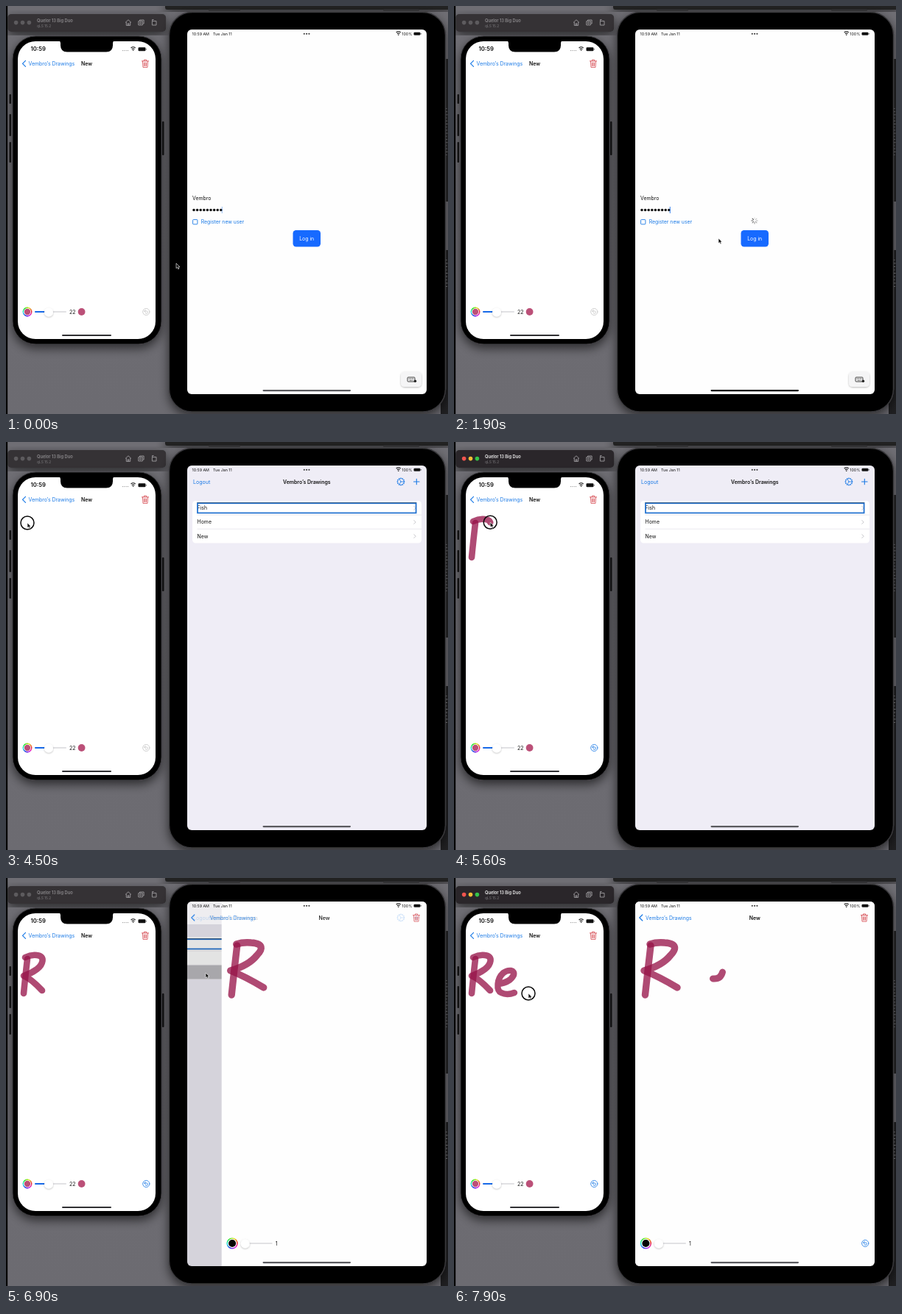
Write an HTML page that moves like this. It is 600x555 px and loops after 8000 ms.

```html
<!DOCTYPE html>
<html lang="en">
<head>
<meta charset="utf-8">
<title>Shared drawing</title>
<style>
  html, body { margin: 0; width: 100%; height: 100%; overflow: hidden; background: #000; }
  svg { display: block; width: 100vw; height: 100vh; }
  text { font: 6.9px Inter, "Liberation Sans", sans-serif; fill: #111; white-space: pre; }
  .bold { font-weight: 600; }
  .blue { fill: #1b7ae6; }
  .line { fill: none; stroke: #1b7ae6; stroke-linecap: round; stroke-linejoin: round; }
  .ink { fill: none; stroke: #961248; stroke-opacity: .76; stroke-linecap: round; stroke-linejoin: round; }
</style>
</head>
<body>
<svg id="stage" viewBox="0 0 600 555" preserveAspectRatio="none"></svg>
<script>
const LOOP = 8000, STEP = 100, SCREEN_W = 325;
const stage = document.getElementById('stage');

// Shape helpers
const rect = (x, y, w, h, r, fill, more = '') =>
  `<rect x="${x}" y="${y}" width="${w}" height="${h}" rx="${r}" fill="${fill}" ${more}/>`;
const dot = (x, y, r, fill, more = '') => `<circle cx="${x}" cy="${y}" r="${r}" fill="${fill}" ${more}/>`;
const text = (x, y, s, more = '') => `<text x="${x}" y="${y}" ${more}>${s}</text>`;
const line = (d, width = 1, more = '') => `<path class="line" d="${d}" stroke-width="${width}" ${more}/>`;
const times = (n, f) => Array.from({ length: n }, (_, i) => f(i)).join('');
const group = (id, body, more = '') => `<g id="${id}" ${more}>${body}</g>`;

const backChevron = (x, y) => line(`M${x + 4} ${y - 4}l-4 4 4 4`, 1.2);
const rowChevron = y => line(`M553.8 ${y - 2.4}l2.4 2.4-2.4 2.4`, .8, 'style="stroke:#b9b9be"');
const trash = (x, y) => line(
  `M${x - 4.6} ${y - 3.4}h9.2M${x - 1.6} ${y - 3.6}v-1.5h3.2v1.5M${x - 3.6} ${y - 3.2}l.6 8.3h6l.6-8.3` +
  `M${x} ${y - 1.3}v4.5M${x - 1.6} ${y - 1.3}l.2 4.5M${x + 1.6} ${y - 1.3}l-.2 4.5`, .8, 'style="stroke:#d5434b"');
const undo = (id, x, y) => group(id,
  `<circle class="line" cx="${x}" cy="${y}" r="4.6" stroke-width=".8"/>` +
  line(`M${x - .8} ${y - 2.6}l-1.8 1.6 1.8 1.6M${x - 2.4} ${y - 1}h3a1.6 1.6 0 0 1 0 3.2h-1.4`, .8));

function colorWell(x, y, r, fill) {
  const n = 24, point = i => {
    const a = -i * 2 * Math.PI / n;
    return `${(x + r * Math.cos(a)).toFixed(2)} ${(y + r * Math.sin(a)).toFixed(2)}`;
  };
  return dot(x, y, r, '#fff') +
    times(n, i => `<path d="M${point(i)}L${point(i + 1.1)}" stroke="hsl(${i * 360 / n},78%,50%)" stroke-width="1.4"/>`) +
    dot(x, y, r * .73, fill);
}

const slider = (x, end, knob, y, label) =>
  rect(x, y - 1, end - x, 2, 1, '#e1e1e4') + rect(x, y - 1, knob - x, 2, 1, '#1769e8') +
  dot(knob, y + .4, 6, '#fff', 'filter="url(#soft)"') + text(end + 4, y + 2.6, label);

const wifi = (x, y) => `<g fill="none" stroke="#111" stroke-width="1.1">
  <path d="M${x - 3} ${y - 1.8}q3-2.6 6 0M${x - 1.8} ${y}q1.8-1.5 3.6 0"/></g>` + dot(x, y + 1.5, .8, '#111');
const battery = (x, y, w, h) =>
  rect(x, y, w, h, 1.3, '#111') + rect(x + w + .5, y + h / 2 - .8, .8, 1.6, .3, '#555');

const ink = (id, d, width) => `<path id="${id}" class="ink" d="${d}" stroke-width="${width}" pathLength="1"/>`;

// Static backdrop and window chrome
const backdrop = `
  <defs>
    <filter id="soft" x="-50%" y="-50%" width="200%" height="200%">
      <feDropShadow dx="0" dy=".9" stdDeviation="1.3" flood-opacity=".28"/></filter>
    <filter id="shade" x="-20%" y="-20%" width="140%" height="140%">
      <feDropShadow dx="0" dy="5" stdDeviation="7" flood-opacity=".6"/></filter>
    <linearGradient id="wall" x2="0" y2="1">
      <stop stop-color="#6f6e74"/><stop offset="1" stop-color="#6c6b71"/></linearGradient>
    <clipPath id="padClip"><rect x="246" y="32" width="325" height="496" rx="6"/></clipPath>
  </defs>
  ${rect(0, 0, 600, 555, 0, 'url(#wall)')}
  ${rect(0, 0, 2.2, 555, 0, '#050506')}
  ${rect(590, 72, 10, 194, 0, '#242426')}${rect(590, 332, 10, 223, 0, '#202022')}
  ${times(16, i => rect(597, 139 + i * 4.2, 1.6 + i * 7 % 3 * .5, 1, 0, '#77777a'))}
  ${times(9, i => rect(597, 345 + i * 4.5, 1.5 + i * 5 % 3 * .5, 1, 0, '#88888b'))}
  ${rect(216, -6, 390, 11, 3, '#222224', 'filter="url(#shade)"')}
  ${rect(275, 4.5, 43, 2.5, 1, '#39393b')}${rect(512, 4.5, 49, 2.5, 1, '#39393b')}`;

const phone = `
  ${rect(2.2, 11, 215, 24, 5, '#343234', 'id="bar" filter="url(#shade)"')}
  ${times(3, i => dot(13.6 + i * 8.9, 22.6, 2.8, '#5d5b5e', `id="light${i}"`))}
  ${text(42, 22.3, 'Quelor 13 Big Duo', 'id="device" class="bold" style="font-size:5.7px"')}
  ${text(42, 28.6, 'qLS 15.2', 'style="font-size:4.8px;fill:#7b797c"')}
  <g fill="none" stroke="#a09ea1" stroke-width=".9">
    <path d="M162 22.5l4-3.7 4 3.7M163.3 22v4.4h5.4V22M165.3 26.4v-2.6h1.5v2.6"/>
    <path d="M181.5 20v-1h5.6v5h-1M179.8 20.6h5.5v5.3h-5.5z"/><circle cx="182.5" cy="23.2" r="1.1"/>
    <path d="M198.4 20.5h5.6v5.5h-5.6zM198.6 20.5v-2h2"/>
  </g>
  ${[[120, 13], [147, 30], [185, 28]].map(([y, h]) => rect(4.5, y, 2.5, h, 1, '#171718')).join('')}
  ${rect(212, 157, 2.5, 46, 1, '#171718')}
  ${rect(9, 41, 202, 419, 31, '#000', 'filter="url(#shade)" stroke="#3a393c" stroke-width="1"')}
  ${rect(16, 48, 187, 405, 24, '#fff')}
  <path d="M72 47.5q2 .5 2 3v3q0 9 9 9h53q9 0 9-9v-3q0-2.500 2-3z" fill="#000"/>
  ${text(33.5, 61.4, '10:59', 'class="bold" style="font-size:7.7px"')}
  ${times(4, i => dot(158.6 + i * 2.3, 60.6, .6, '#888'))}
  ${wifi(172.6, 58.8)}${battery(179.5, 56.2, 10, 5)}
  ${backChevron(22.5, 78.3)}${text(30.5, 80.8, 'Vembro\u2019s Drawings', 'class="blue"')}
  ${text(102, 80.8, 'New', 'class="bold"')}${trash(189, 78.3)}
  ${ink('stem', 'M29 110Q26 136 24 157', 8.6)}
  ${ink('bowl', 'M26 108Q34 104 42 105C54 106 50 118 42 124Q34 130 24 133Q34 137 49 153', 8.6)}
  ${ink('letterE', 'M61 144Q76 142 81 132C83 125 74 124 67 129C58 137 57 153 64 156Q72 160 82 156', 8.4)}
  ${colorWell(29, 416, 5.7, '#bd4f77')}${slider(39, 82, 58, 416, '22')}${dot(102.6, 416, 4.9, '#bb5078')}
  ${undo('phoneUndo', 190.3, 416)}
  ${rect(76, 447, 67, 2, 1, '#303033')}`;

const login = `
  ${rect(246, 32, 325, 496, 0, '#fefefe')}
  ${text(253, 264, 'Vembro')}
  ${times(9, i => dot(255 + i * 4.6, 277.6, 1.75, '#111'))}
  ${rect(292.8, 273, .9, 9, 0, '#2274e8', 'id="caret"')}
  ${rect(253.6, 290.6, 6.3, 6.3, .8, 'none', 'stroke="#1b7ae6" stroke-width=".9"')}
  ${text(264.7, 296.4, 'Register new user', 'class="blue"')}
  ${group('spinner', times(8, i => `<path id="spoke${i}" d="M408 290v-2.200" stroke="#555" stroke-width="1"
    stroke-linecap="round" transform="rotate(${i * 45} 408 292)"/>`))}
  ${group('button', rect(389.5, 305, 37.5, 22.5, 4.2, '#176aff') +
    text(408.2, 318.7, 'Log in', 'text-anchor="middle" style="fill:#fff"'))}
  ${rect(536, 497.5, 28, 20.5, 5, '#f5f5f6', 'filter="url(#soft)"')}
  <g fill="none" stroke="#333" stroke-width=".9">${rect(545, 505, 10, 6, 1, 'none')}
    <path d="M546.5 507h7M547.5 509.3h5" stroke-dasharray="1 .5"/></g>${dot(555.4, 510.3, 1.8, '#222')}`;

const list = `
  ${rect(246, 32, 325, 496, 0, '#efedf6')}
  ${rect(253, 80, 311, 57.6, 4.5, '#fff')}
  <path id="picked" d="M253 118.500h311v14.600q0 4.500-4.500 4.500h-302q-4.500 0-4.500-4.500z" fill="#bdbcc0"/>
  <path d="M259.500 99.200H564M259.500 118.300H564" stroke="#dddce2" stroke-width=".6"/>
  ${['Fish', 'Home', 'New'].map((s, i) => text(259.6, 92.2 + i * 19.2, s) + rowChevron(89.8 + i * 19.2)).join('')}
  ${rect(260, 83.3, 296.600, 13.2, 0, 'none', 'stroke="#1c6ecf" stroke-width="1.700"')}
  <path d="M259.300 82.600h298" stroke="#26415f" stroke-width=".7"/>
  ${rect(246, 32, 325, 496, 0, '#000', 'id="dim"')}`;

const canvas = `
  ${rect(246, 32, 325, 496, 0, '#fefefe')}
  ${ink('padStem', 'M267 92Q263 126 259.500 159', 9.4)}
  ${ink('padBowl', 'M266 90Q275 87 286 88C303 89 302 97 294 105Q283 119 258 126Q278 134 303 149', 9.4)}
  ${ink('padE', 'M351.500 137Q362 138 364.500 128', 9)}
  ${colorWell(260.4, 497, 6.9, '#050505')}${slider(278, 315, 278, 497, '1')}
  ${undo('padUndo', 558.2, 497)}`;

const gear = `<circle class="line" cx="536" cy="54" r="4.400" stroke-width=".900"/>` +
  line('M536 54h4M536 54l-2-3.500M536 54l-2 3.500', .8) +
  times(12, i => line('M536 49.400v-.6', .8, `transform="rotate(${i * 30} 536 54)"`));

const pad = `
  ${rect(221.5, 8.5, 375, 543.5, 31, '#000', 'filter="url(#shade)" stroke="#39383b" stroke-width="1.500"')}
  <g clip-path="url(#padClip)">
    ${group('login', login)}
    ${group('list', list)}
    ${rect(246, 32, 325, 31, 0, '#fff', 'id="navFade"')}
    ${group('canvas', canvas)}
    ${group('listNav', text(254, 56.5, 'Logout', 'class="blue" style="font-size:7.100px"') + gear +
      line('M553.500 54h7.600M557.300 50.200v7.600', 1.1))}
    ${text(408.3, 56.5, 'Vembro\u2019s Drawings', 'id="listTitle" class="bold" text-anchor="middle"')}
    ${group('drawNav', backChevron(251.8, 54) + trash(557, 54))}
    ${text(260, 56.5, 'Vembro\u2019s Drawings', 'id="backLabel" class="blue"')}
    ${text(408.3, 56.5, 'New', 'id="drawTitle" class="bold" text-anchor="middle"')}
    <g style="font-size:5.300px">
      ${text(252.5, 39.8, '10:59 AM', 'style="font-size:5.300px"')}
      ${text(281, 39.8, 'Tue Jan 11', 'style="font-size:5.300px"')}
      ${text(537.3, 39.8, '100%', 'style="font-size:5.300px"')}
    </g>
    ${times(3, i => dot(404.8 + i * 3.3, 37.8, 1.1, '#444'))}
    ${wifi(532.7, 37.8)}${battery(553.5, 35.8, 9, 4)}
    ${rect(348.5, 522, 119.5, 2.2, 1.1, '#555', 'id="padHome"')}
  </g>`;

const pointer = group('pointer',
  `<circle id="ring" r="9" fill="none" stroke="#0a0a0a" stroke-width="1.500"/>
   <path d="M0 0v6.800l1.600-1.400 1.100 2.500 1.300-.6-1.100-2.400h2.100z" fill="#111" stroke="#fff" stroke-width=".6"/>`);

stage.innerHTML = backdrop + phone + pad + pointer;

const nodes = {};
stage.querySelectorAll('[id]').forEach(n => nodes[n.id] = n);
const set = (id, attrs) => Object.entries(attrs).forEach(([k, v]) => nodes[id].setAttribute(k, v));
const show = (id, on) => set(id, { display: on ? 'inline' : 'none' });
const clamp = v => Math.max(0, Math.min(1, v));
const ramp = (t, a, b) => clamp((t - a) / (b - a));
const between = (t, a, b) => t >= a && t < b;

// Strokes made with the pointer on the phone: [path, start, end]
const strokes = [['stem', 4500, 5100], ['bowl', 5400, 6150], ['letterE', 7400, 7780]];
const presses = [[1500, 1600], [6550, 6650], [7880, 8000]];
const route = [
  [0, 231, 350], [300, 231, 350], [1000, 380, 322], [1400, 404, 317], [1700, 404, 317],
  [1900, 359, 316], [2300, 210, 190], [2700, 90, 98], [3300, 62, 106], [4000, 30, 110],
  [4500, 29, 110], [5100, 24, 157], [5400, 26, 108], [6150, 49, 153], [6300, 242, 140],
  [6500, 271, 129], [7000, 271, 129], [7200, 190, 134], [7400, 61, 144],
  [7780, 82, 156], [7880, 101, 157], [8000, 101, 157]
];

function pointerAt(t) {
  for (const [id, a, b] of strokes) {
    if (!between(t, a, b)) continue;
    const path = nodes[id], p = path.getPointAtLength(path.getTotalLength() * ramp(t, a, b));
    return [p.x, p.y];
  }
  const i = route.findIndex(k => k[0] > t);
  const [t0, x0, y0] = route[i - 1], [t1, x1, y1] = route[i];
  const u = ramp(t, t0, t1);
  return [x0 + (x1 - x0) * u, y0 + (y1 - y0) * u];
}

function reveal(id, p) {
  show(id, p > 0);
  set(id, { 'stroke-dasharray': p < 1 ? `${p} 2` : 'none' });
}

function render(t) {
  const [x, y] = pointerAt(t);
  set('pointer', { transform: `translate(${x} ${y})` });
  show('ring', strokes.concat(presses).some(s => between(t, ...s.slice(-2))));

  const active = between(t, 4600, 6550) || t >= 7350;
  set('bar', { fill: active ? '#292729' : '#343234' });
  ['#f2554f', '#f3bd35', '#35c449'].forEach((c, i) => set('light' + i, { fill: active ? c : '#5d5b5e' }));
  nodes.device.style.fill = active ? '#f0f0f0' : '#8b898c';

  strokes.forEach(([id, a, b]) => reveal(id, ramp(t, a, b)));
  reveal('padE', ramp(t, 7650, 7900));
  set('phoneUndo', t < 5100 ? { style: 'filter:grayscale(1);opacity:.4' } : { style: '' });

  // Log in, then the list replaces the form at once
  const loggedIn = t >= 2100;
  show('login', !loggedIn);
  show('list', loggedIn);
  set('caret', { opacity: clamp(.5 + .9 * Math.cos(2 * Math.PI * (t - 750) / 1000)) });
  set('button', { opacity: between(t, 1500, 1600) ? .4 : 1 });
  show('spinner', t >= 1600);
  for (let i = 0; i < 8; i++)
    set('spoke' + i, { opacity: 1 - .8 * ((Math.floor(t / 125) - i + 8000) % 8) / 7 });
  set('padHome', { fill: between(t, 1500, 2100) ? '#050505' : '#5a5a5e' });

  // Push from the list to the drawing
  const rest = (1 - ramp(t, 6700, 7120)) ** 3, done = 1 - rest;
  const pushing = t > 6700;
  show('picked', t >= 6600);
  set('list', { transform: `translate(${-.3 * SCREEN_W * done} 0)` });
  set('dim', { opacity: .13 * done });
  set('navFade', { opacity: pushing ? .7 * done : 0 });
  show('canvas', pushing);
  set('canvas', { transform: `translate(${SCREEN_W * rest} 0)` });
  show('listNav', loggedIn);
  show('listTitle', loggedIn);
  set('listNav', { opacity: pushing ? rest * 1.5 : 1 });
  set('listTitle', { opacity: pushing ? rest : 1, transform: `translate(${-115 * done} 0)` });
  set('drawNav', { opacity: pushing ? done : 0 });
  set('backLabel', { opacity: pushing ? done : 0, transform: `translate(${115 * rest} 0)` });
  set('drawTitle', { opacity: pushing ? done : 0, transform: `translate(${165 * rest} 0)` });
}

function tick() {
  render(Math.floor(performance.now() % LOOP / STEP) * STEP);
  requestAnimationFrame(tick);
}
tick();
</script>
</body>
</html>
```
